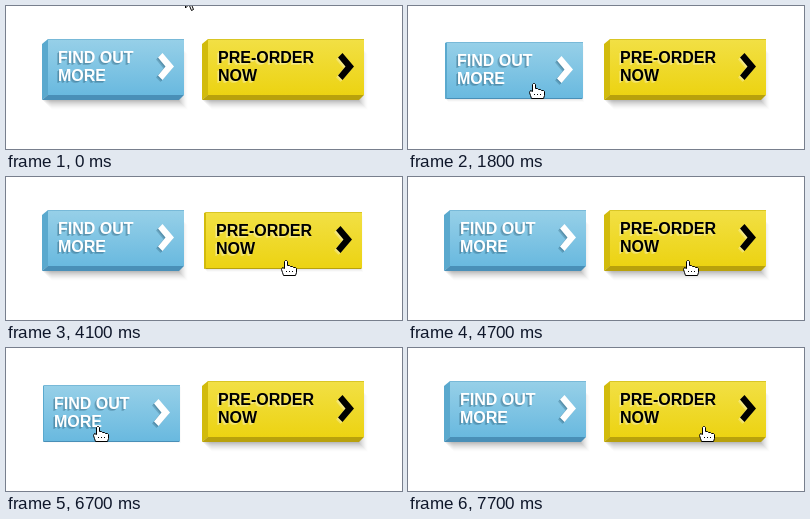
Write an HTML page with a canvas that moves like this. It is 396 px wide and 143 px high and loops after 8000 ms.

```html
<!DOCTYPE html>
<html lang="en">
<head>
<meta charset="utf-8">
<title>Push buttons</title>
<style>
html, body { margin: 0; width: 100%; height: 100%; overflow: hidden; background: #fff; }
canvas { display: block; }
</style>
</head>
<body>
<canvas id="stage" width="396" height="143"></canvas>
<script>
const ctx = document.getElementById('stage').getContext('2d');
const LOOP = 8000, STEP = 100;
const TOP = 33, HEIGHT = 56, DEPTH = 6, TRAVEL = 5;

// "flatten" is how fast the sides collapse while the face travels.
const blue = {
  x: 42, w: 136, lines: ['FIND OUT', 'MORE'], ink: '#fff', textShadow: 'rgba(40,85,110,.28)',
  rim: '#78b9d8', top: '#97d0e8', bottom: '#69b9df', side: '#5aa9ce', base: '#498fb7',
  flatten: 1.2,
  clicks: [{ press: 1100, release: 1700, ms: 200 }, { press: 5700, release: 6600, ms: 300 }]
};
const yellow = {
  x: 202, w: 156, lines: ['PRE-ORDER', 'NOW'], ink: '#000', textShadow: 'rgba(255,255,255,.25)',
  rim: '#d9c625', top: '#f2e045', bottom: '#ecd312', side: '#d2bb0c', base: '#b8a10c',
  flatten: 2,
  clicks: [{ press: 4000, release: 4500, ms: 200 }, { press: 7500, release: 7600, ms: 100 }]
};
const buttons = [blue, yellow];

const origin = { x: 179, y: -14 };
const moves = [
  { from: 100, to: 400, x: 126, y: 77 },
  { from: 2900, to: 3000, x: 147, y: 82 },
  { from: 3000, to: 3600, x: 280, y: 83, dip: 16 },
  { from: 4800, to: 5100, x: 92, y: 93 },
  { from: 5200, to: 5500, x: 92, y: 78 },
  { from: 7000, to: 7400, x: 296, y: 78 }
];

const progress = (t, from, to) => Math.min(1, Math.max(0, (t - from) / (to - from)));
const easeOut = p => Math.sin(p * Math.PI / 2);

function pushAt(clicks, t) {
  const ramp = (from, ms) => progress(t, from, from + ms) ** 1.4;
  return Math.round(TRAVEL * clicks.reduce(
    (sum, c) => sum + ramp(c.press, c.ms) - ramp(c.release, c.ms), 0));
}

function pointerAt(t) {
  let { x, y } = origin;
  for (const m of moves) {
    const p = easeOut(progress(t, m.from, m.to));
    x += (m.x - x) * p;
    y += (m.y - y) * p + (m.dip || 0) * Math.sin(Math.PI * p);
  }
  return { x: Math.round(x), y: Math.round(y) };
}

function polygon(points, fill, stroke) {
  ctx.beginPath();
  points.forEach(([x, y]) => ctx.lineTo(x, y));
  ctx.closePath();
  ctx.fillStyle = fill;
  ctx.fill();
  if (stroke) {
    ctx.strokeStyle = stroke;
    ctx.lineWidth = 1;
    ctx.stroke();
  }
}

function drawLabel(b, x, y, color) {
  ctx.fillStyle = color;
  b.lines.forEach((line, i) => ctx.fillText(line, x + 10, y + 24 + i * 18));
  const cx = x + b.w - 26, cy = y + 27.5;
  polygon([[0, -9], [4.5, -13.5], [16, 0], [4.5, 13.5], [0, 9], [7.5, 0]]
    .map(([px, py]) => [cx + px, cy + py]), color);
}

function drawShadow(x, y, w, depth) {
  const reach = Math.round(depth * 1.6);
  for (let i = reach; i > 0; i--) {
    ctx.fillStyle = `rgba(0,0,0,${0.06 * (1 - i / (reach + 1))})`;
    ctx.fillRect(x - depth + i, y + depth + i - 1, w, HEIGHT);
  }
}

function drawButton(b, t) {
  const push = pushAt(b.clicks, t);
  const depth = Math.max(1, Math.round(DEPTH - push * b.flatten));
  const drop = Math.max(1, depth - 1);
  const x = b.x - push, y = TOP + push;
  const right = x + b.w, foot = y + HEIGHT;

  drawShadow(x, y, b.w, depth);
  polygon([[x, y], [x, foot], [x - depth, foot + drop], [x - depth, y + drop]], b.side);
  polygon([[x, foot], [right, foot], [right - drop, foot + drop], [x - depth, foot + drop]], b.base);

  const face = ctx.createLinearGradient(0, y, 0, foot);
  face.addColorStop(0, b.top);
  face.addColorStop(1, b.bottom);
  ctx.fillStyle = face;
  ctx.fillRect(x, y, b.w, HEIGHT);
  ctx.fillStyle = b.rim;
  ctx.fillRect(x, y, b.w, 1);

  for (const offset of [2, 1]) drawLabel(b, x - offset, y + offset, b.textShadow);
  drawLabel(b, x, y, b.ink);
}

function drawHand() {
  ctx.translate(-5, 0);
  polygon([[3.5, 1.5], [4.5, .5], [5.5, .5], [6.5, 1.5], [6.5, 5.5], [8.5, 5.5],
    [9.5, 6.5], [11.5, 6.5], [12.5, 7.5], [14.5, 7.5], [15.5, 8.5], [15.5, 12.5],
    [14.5, 15.5], [2.5, 15.5], [1.5, 12.5], [.5, 9.5], [1.5, 7.5], [3.5, 8.5]], '#fff', '#000');
  ctx.fillStyle = '#000';
  for (let x = 5; x <= 11; x += 3) ctx.fillRect(x, 11, 1, 1);
}

function drawArrow() {
  polygon([[.5, .5], [.5, 16], [4, 12.5], [6.5, 18.5], [8.5, 17.5], [6, 11.5], [11, 11.5]], '#fff', '#000');
}

function drawPointer(t) {
  const { x, y } = pointerAt(t);
  const over = buttons.some(b =>
    x >= b.x - DEPTH && x <= b.x + b.w && y >= TOP && y < TOP + HEIGHT + DEPTH - 2);
  ctx.save();
  ctx.translate(x, y);
  if (over) drawHand(); else drawArrow();
  ctx.restore();
}

function draw(now) {
  const t = Math.floor((now % LOOP) / STEP) * STEP;
  ctx.fillStyle = '#fff';
  ctx.fillRect(0, 0, 396, 143);
  ctx.font = 'bold 16px "Liberation Sans", Arial, sans-serif';
  buttons.forEach(b => drawButton(b, t));
  drawPointer(t);
}

const start = performance.now();
function tick() {
  draw(performance.now() - start);
  requestAnimationFrame(tick);
}
tick();
</script>
</body>
</html>
```
